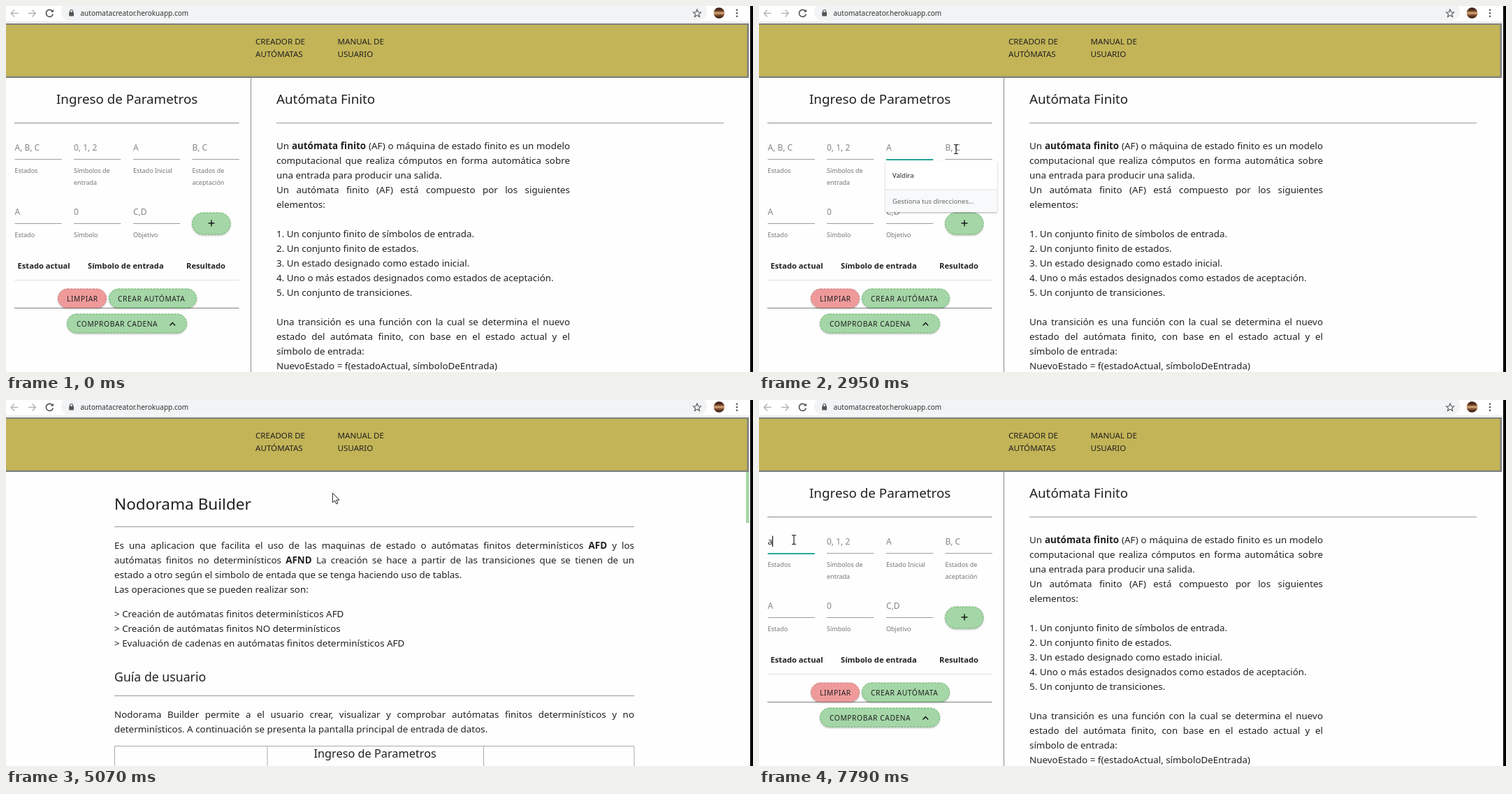
Recreate the animation shown at these times as an HTML page. Size 1069x524 px, loop 8000 ms.

```html
<!DOCTYPE html>
<html lang="es">
<head>
<meta charset="utf-8">
<title>Creador de autómatas</title>
<style>
html, body { margin: 0; width: 100%; height: 100%; overflow: hidden; background: #fff; }
svg { display: block; width: 100vw; height: 100vh; }
text { font: 13.4px 'Noto Sans', 'Open Sans', sans-serif; fill: #212121; }
.b { font-weight: 700; }
.url { font-size: 10px; fill: #333; }
.nav { font-size: 11.6px; }
.h1 { font-size: 22.6px; }
.h2 { font-size: 18.8px; }
.h3 { font-size: 17.7px; }
.h4 { font-size: 16.3px; }
.ph { font-size: 12px; fill: #858585; }
.val { font-size: 12px; }
.lab { font-size: 9px; fill: #757575; }
.th { font-size: 11.2px; font-weight: 700; }
.btn { font-size: 10.3px; letter-spacing: .55px; }
.tip { font-size: 9.5px; }
.dim { fill: #666; }
</style>
</head>
<body>
<svg id="stage" viewBox="0 0 1069 524" preserveAspectRatio="none">
  <defs>
    <filter id="shade" x="-20%" y="-20%" width="140%" height="150%">
      <feDropShadow dx="0" dy="1.2" stdDeviation="1.2" flood-opacity=".3"/>
    </filter>
    <linearGradient id="dusk" x2="0" y2="1">
      <stop offset="0" stop-color="#2a1712"/><stop offset=".3" stop-color="#6a3c22"/>
      <stop offset=".5" stop-color="#e0b080"/><stop offset=".7" stop-color="#7a4a2c"/>
      <stop offset="1" stop-color="#2a1812"/>
    </linearGradient>
  </defs>
  <rect width="1069" height="524" fill="#fefefe"/>
  <g id="creator"></g>
  <g id="manual"></g>
  <g id="header"></g>
  <g id="bar"></g>
  <rect x="1065" width="4" height="524" fill="#000"/>
  <g id="popup"></g>
  <g id="pointer">
    <circle id="glow" r="9.5" fill="#f2e600" opacity=".72"/>
    <path id="arrow" d="M0 0V13.6L3.2 10.7L5.4 15.6L7.6 14.6L5.4 9.9H9.7Z" fill="#fff" stroke="#222"/>
    <path id="beam" d="M-3 -6.5H-1Q0 -6.5 0 -5.5Q0 -6.5 1 -6.5H3M0 -5.5V5.5M-3 6.5H-1Q0 6.5 0 5.5Q0 6.5 1 6.5H3" fill="none" stroke="#222" stroke-width="1.2"/>
    <path id="hand" d="M-1.3 .8Q0 -.9 1.3 .8V6Q2.7 4.8 3.9 6.3Q5.5 5.3 6.4 7Q8.4 6.2 8.9 8.4V11.4L7.4 16.6H.6L-4.4 10.4Q-4.4 8.2 -2.6 9L-1.3 10Z" fill="#fff" stroke="#222"/>
  </g>
</svg>
<script>
const $ = id => document.getElementById(id);
const fill = (id, parts) => { $(id).innerHTML = parts.join(''); };

// *text* marks bold words
const rich = s => s.replace(/\*(.+?)\*/g, '<tspan class="b">$1</tspan>');
const text = (x, y, s, cls = '') => `<text x="${x}" y="${y}" class="${cls}">${rich(s)}</text>`;
const wide = (x, y, s, w) => `<text x="${x}" y="${y}" data-w="${w}">${rich(s)}</text>`;
const line = (x1, y1, x2, y2, color = '#8a8a8a', w = 1) =>
  `<path d="M${x1} ${y1}L${x2} ${y2}" stroke="${color}" stroke-width="${w}" fill="none"/>`;
const rect = (x, y, w, h, color, more = '') =>
  `<rect x="${x}" y="${y}" width="${w}" height="${h}" fill="${color}" ${more}/>`;
const button = (x, y, w, h, color, edge) =>
  rect(x, y, w, h, color, `rx="${h / 2}" stroke="${edge}" stroke-dasharray="3 1.5" filter="url(#shade)"`);
const lines = (x, y, width, rows) =>
  rows.map((s, i) => s[0] === '=' ? wide(x, y + i * 21, s.slice(1), width) : text(x, y + i * 21, s));

const fieldX = [12.5, 97, 182, 266.5];
const hints = ['A, B, C', '0, 1, 2', 'A', 'B, C'];
const labels = ['Estados', 'Símbolos de|entrada', 'Estado Inicial', 'Estados de|aceptación'];
const green = ['#a5d6a7', '#66b56a'];

fill('bar', [
  rect(0, 0, 1065, 22, '#fff'),
  rect(79, -4, 924, 25, '#f1f3f4', 'rx="12"'),
  rect(0, 22, 1065, 3, '#eee'),
  '<g fill="none" stroke-width="1.4">',
  '<path d="M17.500 10.500H7.500M12 5.500L7.200 10.500L12 15.500M32 10.500H42M37.500 5.500L42.300 10.500L37.500 15.500" stroke="#b5b5b5"/>',
  '<path d="M66.500 7.500A5 5 0 1 0 67.300 11.500" stroke="#555" stroke-width="1.600"/>',
  '<path d="M91.600 9V7.500A2 2 0 0 1 95.600 7.500V9" stroke="#555" stroke-width="1.200"/>',
  '<path d="M989 5L990.600 8.700L994.500 9L991.500 11.600L992.500 15.500L989 13.400L985.500 15.500L986.500 11.600L983.500 9L987.400 8.700Z" stroke="#555" stroke-width="1.100"/></g>',
  '<path d="M64 8.800H68V4.800Z" fill="#555"/>',
  rect(90.2, 8.8, 6.8, 5.6, '#555', 'rx=".6"'),
  text(106.5, 14, 'automatacreator.herokuapp.com', 'url'),
  '<circle cx="1020.500" cy="10" r="7.800" fill="url(#dusk)"/>',
  ...[5.8, 10.3, 14.8].map(y => `<circle cx="1046" cy="${y}" r="1.300" fill="#555"/>`)
]);

const link = (id, x, a, b) =>
  `<g id="${id}">${text(x, 55, a, 'nav')}${text(x, 72.500, b, 'nav')}</g>` +
  `<g id="${id}Line">${line(x - 4, 82, x + 113, 82, '#4caf50', 1.8)}</g>`;
fill('header', [
  rect(0, 25, 1063, 78, '#808080'),
  rect(0, 27, 1060.5, 73.7, '#c3b457'),
  link('navA', 357, 'CREADOR DE', 'AUTÓMATAS'),
  link('navB', 474.5, 'MANUAL DE', 'USUARIO')
]);

fill('creator', [
  line(350.5, 103, 350.5, 524),
  text(72, 139.5, 'Ingreso de Parametros', 'h2'),
  line(12, 167.5, 333.5, 167.5),
  ...fieldX.map((x, i) =>
    `<g id="hint${i}">${text(x, 207, hints[i], 'ph')}</g>` +
    `<path id="rule${i}"/>` +
    labels[i].split('|').map((s, k) => text(x, 239 + 17 * k, s, 'lab')).join('')),
  ...['A', '0', 'C,D'].map((s, i) => text(fieldX[i], 299, s, 'ph') +
    line(fieldX[i], 311.5, fieldX[i] + 67.3, 311.5, '#9e9e9e') +
    text(fieldX[i], 331, ['Estado', 'Símbolo', 'Objetivo'][i], 'lab')),
  `<g id="typed">${text(12.5, 207, 'a', 'val')}</g>`,
  '<path id="caret" stroke="#111" stroke-width="1.200"/>',
  button(266.5, 296, 54.5, 31, ...green),
  line(289.5, 311, 298.5, 311, '#111', 1.4), line(294, 306.5, 294, 315.5, '#111', 1.4),
  text(16.5, 375.5, 'Estado actual', 'th'),
  text(117, 375.5, 'Símbolo de entrada', 'th'),
  text(258, 375.5, 'Resultado', 'th'),
  line(12, 392.5, 333.5, 392.5, '#e0e0e0'),
  line(12, 432.5, 333.5, 432.5, '#808080'),
  button(74.5, 405, 69, 27, '#ef9a9a', '#cf7a7a'),
  button(147.5, 405, 125, 27, ...green),
  button(87.5, 441, 171, 27, ...green),
  text(87, 423, 'LIMPIAR', 'btn'),
  text(160, 423, 'CREAR AUTÓMATA', 'btn'),
  text(101, 459, 'COMPROBAR CADENA', 'btn'),
  '<path d="M234.500 457.500L238.300 453.500L242.100 457.500" fill="none" stroke="#111" stroke-width="1.400"/>',
  text(387, 139.5, 'Autómata Finito', 'h2'),
  line(387, 167.5, 1027, 167.5, '#9a9a9a'),
  ...lines(387, 205, 420, [
    '=Un *autómata finito* (AF) o máquina de estado finito es un modelo',
    '=computacional que realiza cómputos en forma automática sobre',
    'una entrada para producir una salida.',
    '=Un autómata finito (AF) está compuesto por los siguientes',
    'elementos:',
    '',
    '1. Un conjunto finito de símbolos de entrada.',
    '2. Un conjunto finito de estados.',
    '3. Un estado designado como estado inicial.',
    '4. Uno o más estados designados como estados de aceptación.',
    '5. Un conjunto de transiciones.',
    '',
    '=Una transición es una función con la cual se determina el nuevo',
    '=estado del autómata finito, con base en el estado actual y el',
    'símbolo de entrada:',
    'NuevoEstado = f(estadoActual, símboloDeEntrada)'
  ])
]);

fill('manual', [
  text(155, 157, 'Nodorama Builder', 'h1'),
  line(155, 181.5, 899, 181.5, '#9a9a9a'),
  ...lines(155, 212.5, 744, [
    '=Es una aplicacion que facilita el uso de las maquinas de estado o autómatas finitos determinísticos *AFD* y los',
    '=autómatas finitos no determinísticos *AFND* La creación se hace a partir de las transiciones que se tienen de un',
    'estado a otro según el simbolo de entada que se tenga haciendo uso de tablas.',
    'Las operaciones que se pueden realizar son:'
  ]),
  ...lines(155, 311, 744, [
    '&gt; Creación de autómatas finitos determinísticos AFD',
    '&gt; Creación de autómatas finitos NO determinísticos',
    '&gt; Evaluación de cadenas en autómatas finitos determinísticos AFD'
  ]),
  text(155, 402.5, 'Guía de usuario', 'h3'),
  line(155, 423.5, 899, 423.5, '#9a9a9a'),
  ...lines(155, 454.5, 744, [
    '=Nodorama Builder permite a el usuario crear, visualizar y comprobar autómatas finitos determinísticos y no',
    'determinísticos. A continuación se presenta la pantalla principal de entrada de datos.'
  ]),
  '<path d="M155.500 524V495.500H899V524M374 495.500V524M683.500 495.500V524" fill="none" stroke="#aaa"/>',
  text(440.5, 511.5, 'Ingreso de Parametros', 'h4'),
  rect(1059, 103, 4.5, 73, '#a5d6a7')
]);

fill('popup', [
  rect(0, 0, 160, 73.5, '#fff', 'rx="2" filter="url(#shade)"'),
  rect(0, 41.5, 160, 32, '#f8f9fa'),
  line(0, 41.5, 160, 41.5, '#dfe1e5'),
  text(10, 24.5, 'Valdira', 'tip'),
  text(10, 61.5, 'Gestiona tus direcciones...', 'tip dim')
]);

// Justify paragraph lines by widening the word gaps
document.querySelectorAll('text[data-w]').forEach(el => {
  const gaps = el.textContent.split(' ').length - 1;
  el.style.wordSpacing = (el.dataset.w - el.getComputedTextLength()) / gaps + 'px';
});

const LOOP = 8000;
const path = [
  [150, 993, 508], [720, 110, 182], [930, 68, 204], [1400, 68, 205], [1640, 112, 209],
  [1830, 112, 209], [2110, 246, 203], [2450, 246, 205], [2690, 418, 240], [2930, 282, 205],
  [3200, 282, 205], [3800, 504.5, 56], [4670, 504.5, 56], [5000, 474, 140], [5390, 398, 62],
  [5780, 398, 62], [6240, 57, 221], [6460, 50, 200], [LOOP, 50, 200]
];
const focus = [[0, 1010, 1700], [1, 1700, 2230], [2, 2230, 3040], [3, 3040, 4270], [0, 6570, LOOP]];
const popups = [[0, 1170, 1700], [2, 2400, 3040], [0, 6630, 7790]];
const clicks = [[1010, 1200], [1640, 1830], [2230, 2400], [3040, 3200], [4120, 4270], [5560, 5700], [6570, 6750]];
const typeAt = 7680;

const show = (id, on) => $(id).setAttribute('display', on ? 'inline' : 'none');
const at = (list, t) => list.find(([, a, b]) => t >= a && t < b);

function pointerAt(t) {
  let i = 0;
  while (i < path.length - 2 && t >= path[i + 1][0]) i++;
  const [t0, x0, y0] = path[i], [t1, x1, y1] = path[i + 1];
  const u = Math.min(1, Math.max(0, (t - t0) / (t1 - t0)));
  const k = u * u * (3 - 2 * u);
  return [x0 + (x1 - x0) * k, y0 + (y1 - y0) * k];
}

function render(t) {
  const manual = t >= 4270 && t < 5690;
  show('manual', manual);
  show('creator', !manual);

  const [x, y] = pointerAt(t);
  const inNav = y > 42 && y < 84;
  const hover = { navA: inNav && x >= 353 && x < 470, navB: inNav && x >= 470 && x < 588 };
  for (const id in hover) {
    $(id).querySelectorAll('text').forEach(el => el.classList.toggle('b', hover[id]));
    show(id + 'Line', hover[id]);
  }

  // The underline follows the focus with a short delay
  const lit = at(focus, t - 150);
  const active = lit ? lit[0] : -1;
  fieldX.forEach((x, i) => {
    const on = i === active, rule = $('rule' + i);
    rule.setAttribute('d', `M${x} ${on ? 220 : 219.5}h67.300`);
    rule.setAttribute('stroke', on ? '#26a69a' : '#9e9e9e');
    rule.setAttribute('stroke-width', on ? 2 : 1);
  });

  const typed = t >= typeAt;
  show('typed', typed);
  show('hint0', !typed);
  const f = at(focus, t);
  const since = f ? t - (typed ? typeAt : f[1]) : 0;
  show('caret', f && since % 1060 < 530);
  if (f) $('caret').setAttribute('d', `M${fieldX[f[0]] + (typed ? 7 : .8)} 194.500v15.500`);

  const p = at(popups, t);
  show('popup', p);
  if (p) $('popup').setAttribute('transform', `translate(${fieldX[p[0]] - 1} 221.500)`);

  show('pointer', t >= 150);
  $('pointer').setAttribute('transform', `translate(${x} ${y})`);
  show('glow', clicks.some(([a, b]) => t >= a && t < b));
  const link = hover.navA || hover.navB;
  const overField = !manual && y > 192 && y < 216 && fieldX.some(a => x >= a && x < a + 68);
  const overText = !manual && x > 387 && x < 807 && y > 192;
  const beam = overField || overText;
  show('hand', link);
  show('beam', !link && beam);
  show('arrow', !link && !beam);
}

const start = performance.now();
function tick() {
  render((performance.now() - start) % LOOP);
  requestAnimationFrame(tick);
}
tick();
</script>
</body>
</html>
```
